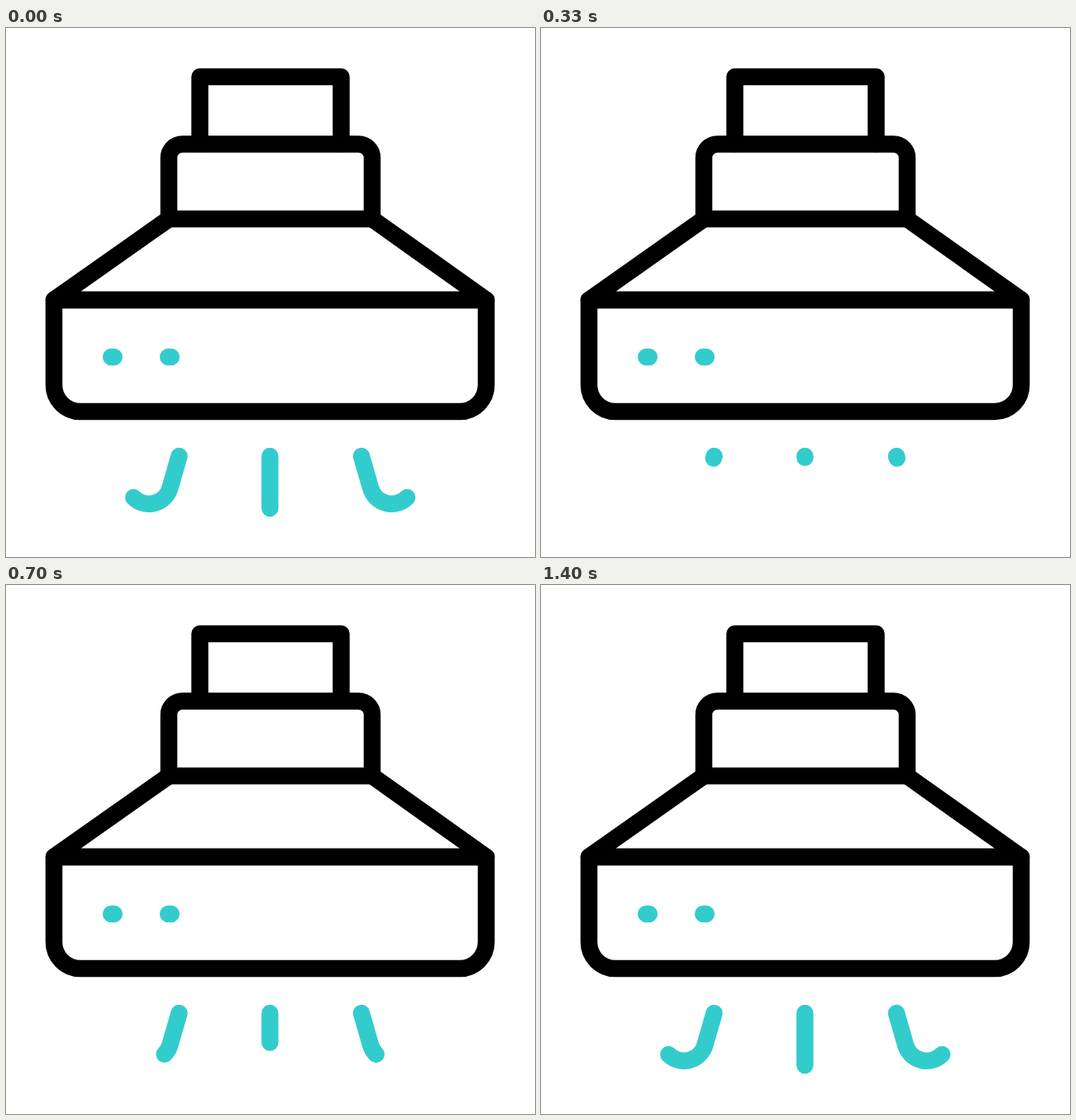
Recreate the animation shown at these times as an HTML page. Size 640x640 px, loop 1.67 s.

```html
<!DOCTYPE html>
<html lang="en">
<head>
<meta charset="utf-8">
<title>Cooker hood</title>
<style>
  html, body { margin: 0; width: 100%; height: 100%; overflow: hidden; background: #fff; }
  svg { display: block; width: 100%; height: 100%; }
  g { fill: none; stroke-width: 20.5; stroke-linecap: round; stroke-linejoin: round; }
  .body { stroke: #000; }
  .accent { stroke: #33cccc; }
</style>
</head>
<body>
<svg viewBox="0 0 640 640">
  <g id="hood">
    <g class="body">
      <path d="M234.5 140V59H405.5V140"/>
      <path d="M197 231V157A16.5 16.5 0 0 1 213.5 140.5H426.5A16.5 16.5 0 0 1 443 157V231Z"/>
      <path d="M197 231L58 329H581L443 231"/>
      <path d="M58 329H581V432A32 32 0 0 1 549 464H90A32 32 0 0 1 58 432Z"/>
    </g>
    <g class="accent">
      <path d="M127.2 398H130.8M196.2 398H199.8"/>
      <g id="steam">
        <path pathLength="1" d="M209.5 518L198.4 556.5A26.5 26.5 0 0 1 154.3 568"/>
        <path pathLength="1" d="M319.3 518V581"/>
        <path pathLength="1" d="M430 518L441.1 556.5A26.5 26.5 0 0 0 485.2 568"/>
      </g>
    </g>
  </g>
</svg>
<script>
  const LOOP = 1670;
  const STEP = 100 / 3;
  const hood = document.getElementById('hood');
  const steam = document.getElementById('steam');

  // Keys are [step, value] pairs, eased in and out between neighbours.
  const swing = [[2.2, 0], [7.1, -7.4], [11.8, 3.6], [18.9, 0]];
  const reach = [[2.6, 1], [10.8, 0], [18.4, 0], [23.2, 1], [28, 0], [31.3, 0], [42, 1]];

  const ease = s => s * s * (3 - 2 * s);

  function valueAt(keys, n) {
    if (n <= keys[0][0]) return keys[0][1];
    for (let i = 1; i < keys.length; i++) {
      const [a, from] = keys[i - 1];
      const [b, to] = keys[i];
      if (n < b) return from + (to - from) * ease((n - a) / (b - a));
    }
    return keys[keys.length - 1][1];
  }

  function draw(ms) {
    const n = Math.floor((ms % LOOP + 3.4) / STEP);
    const length = valueAt(reach, n);
    hood.setAttribute('transform', `rotate(${valueAt(swing, n)} 320 59)`);
    steam.setAttribute('visibility', length > 0.002 ? 'visible' : 'hidden');
    steam.setAttribute('stroke-dasharray', length < 1 ? `${length} 2` : 'none');
  }

  const start = performance.now();
  function tick() {
    draw(performance.now() - start);
    requestAnimationFrame(tick);
  }
  tick();
</script>
</body>
</html>
```
